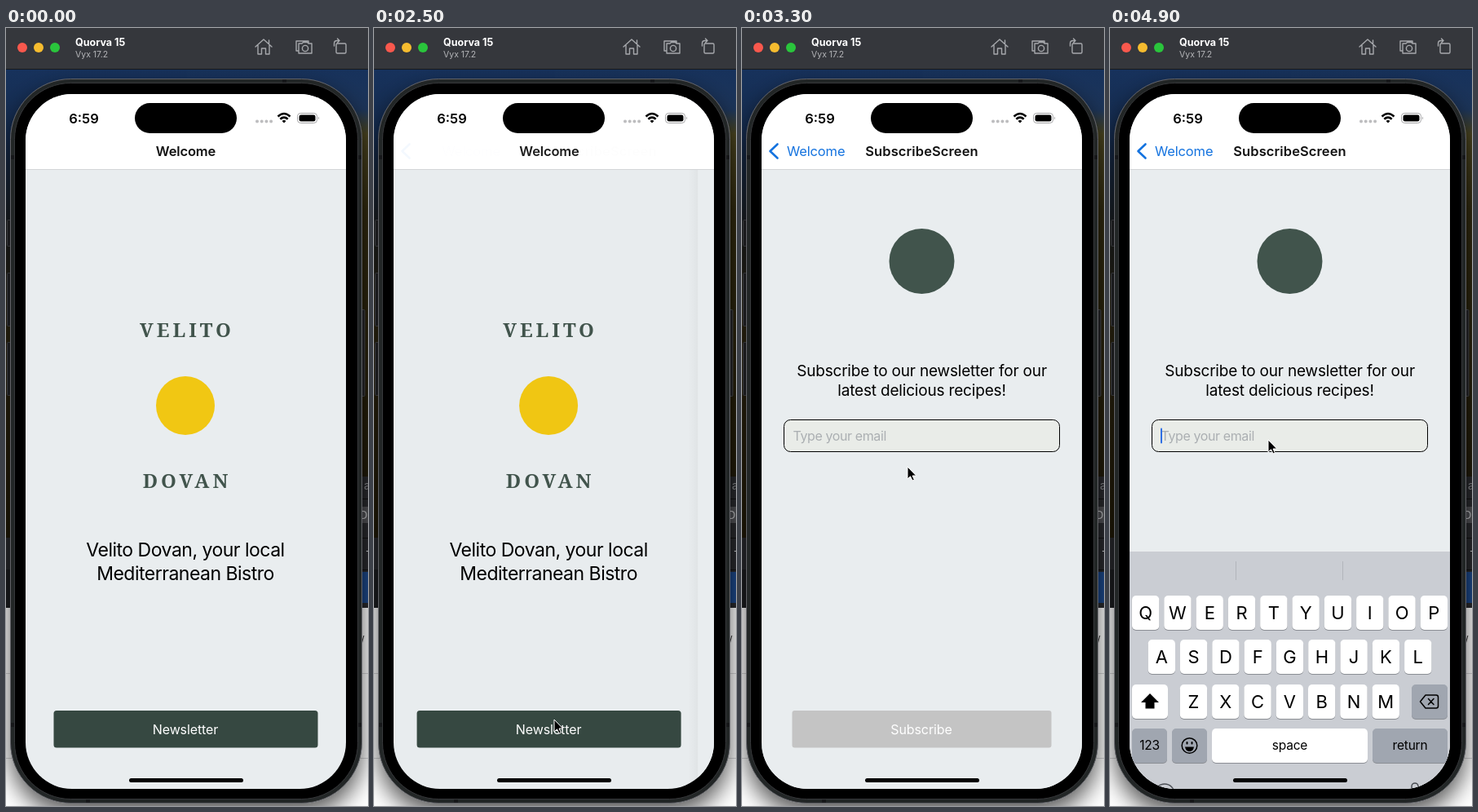
Recreate the animation shown at these times as an HTML page. Size 444 px wide and 954 px high, loop 5 s.

```html
<!DOCTYPE html>
<html lang="en">
<head>
<meta charset="utf-8">
<style>
  html, body { margin: 0; width: 100%; height: 100%; overflow: hidden; background: #fff; }
  svg { display: block; width: 444px; height: 954px; font-family: Inter, sans-serif; }
  .mid { text-anchor: middle; }
  .nav { font-size: 16.5px; font-weight: 600; fill: #111; }
  .label { font-size: 16px; letter-spacing: -.1px; fill: #fff; text-anchor: middle; }
  .headline { font-size: 23px; letter-spacing: -.5px; text-anchor: middle; }
  .lead { font-size: 19px; letter-spacing: -.18px; text-anchor: middle; }
  .brand { font: 700 24px "Noto Serif", serif; letter-spacing: 4px; fill: #41544c; text-anchor: middle; }
  .icon { fill: none; stroke: #a6a8ac; stroke-width: 1.4; stroke-linejoin: round; stroke-linecap: round; }
  .key { font-size: 22px; text-anchor: middle; }
  .word { font-size: 15.5px; letter-spacing: -.2px; text-anchor: middle; }
</style>
</head>
<body>
<svg viewBox="0 0 444 954">
  <defs>
    <linearGradient id="left" x2="0" y2="1">
      <stop stop-color="#17325c"/><stop offset=".15" stop-color="#142a4c"/>
      <stop offset=".34" stop-color="#1a1d1e"/><stop offset=".55" stop-color="#2b2410"/>
      <stop offset="1" stop-color="#1f1806"/>
    </linearGradient>
    <linearGradient id="right" x2="0" y2="1">
      <stop stop-color="#17325c"/><stop offset=".1" stop-color="#1c3458"/>
      <stop offset=".16" stop-color="#4a4420"/><stop offset=".35" stop-color="#30290f"/>
      <stop offset="1" stop-color="#201a08"/>
    </linearGradient>
    <linearGradient id="edge">
      <stop stop-opacity="0"/><stop offset="1" stop-opacity=".035"/>
    </linearGradient>
    <filter id="shade" x="-15%" y="-10%" width="130%" height="120%">
      <feDropShadow dx="0" dy="13" stdDeviation="14" flood-opacity=".65"/>
    </filter>
    <clipPath id="screen"><rect x="24" y="81" width="393" height="852" rx="57"/></clipPath>
  </defs>

  <!-- Desktop -->
  <rect width="444" height="954" fill="#fff"/>
  <rect y="50" width="222" height="575" fill="url(#left)"/>
  <rect x="222" y="50" width="222" height="500" fill="url(#right)"/>
  <path d="M0 625H222V711H0ZM222 550H444V711H222Z" fill="#28292d"/>
  <path d="M0 664H222V711H0Z" fill="#1b1c1f"/>
  <path d="M430 587H444V607H430Z" fill="#505155"/>
  <path d="M430 667H444V705H430Z" fill="#1c4788"/>
  <path d="M0 791.5H444M0 895.5H444" stroke="#d5d5d7"/>
  <path d="M430 577.5H444M430 625.5H444M430 664.5H444" stroke="#111"/>
  <g font-size="13" fill="#c9cacc">
    <text x="439" y="566" fill="#8b8c90">a</text><text x="434" y="602">Di</text><text x="441" y="646">-</text>
    <text x="441" y="692" fill="#fff">⋮</text><text x="435" y="755" fill="#333">/</text>
  </g>

  <!-- Phone -->
  <g fill="#242528" stroke="#4b4c50">
    <rect x="1.500" y="235.500" width="5" height="32" rx="1"/>
    <rect x="1.500" y="300.500" width="5" height="65" rx="1"/>
    <rect x="1.500" y="385.500" width="5" height="65" rx="1"/>
    <rect x="435" y="345.500" width="5" height="106" rx="1"/>
  </g>
  <rect x="5.500" y="62.500" width="431" height="888" rx="74" fill="#242528" stroke="#626468" filter="url(#shade)"/>
  <path d="M339 63H344V68H339ZM98 946H103V950H98ZM6 156H11V161H6ZM431 156H436V161H431ZM6 852H11V857H6ZM431 852H436V857H431Z" fill="#17181a"/>
  <rect x="10.500" y="67.500" width="421" height="878" rx="69" fill="#000" stroke="#37383b"/>

  <!-- Window bar -->
  <rect width="444" height="50" fill="#35373c"/>
  <path d="M0 50.5H444" stroke="#18191c"/>
  <circle cx="20" cy="24" r="6" fill="#f9584d"/>
  <circle cx="40" cy="24" r="6" fill="#f6bc2f"/>
  <circle cx="60" cy="24" r="6" fill="#2ac53c"/>
  <text x="85" y="22" font-size="12.5" font-weight="700" fill="#fff">Quorva 15</text>
  <text x="85" y="36" font-size="10.5" fill="#b4b5b8">Vyx 17.2</text>
  <g class="icon">
    <path d="M306 23L316 14L326 23M309 21V32H313.500V25H318.500V32H323V21M322.500 19V15"/>
    <path d="M358 28H356V16H371V18M359 19H363L364.500 17.500H369.500L371 19H375V31H359Z"/>
    <circle cx="367" cy="25" r="3.600"/>
    <rect x="405" y="19" width="12" height="12" rx="1.500"/>
    <path d="M402.500 22V19Q402.500 15.500 406 15.500H409M406.500 13L409 15.500L406.500 18"/>
  </g>

  <g clip-path="url(#screen)">
    <rect x="24" y="81" width="393" height="852" fill="#e9edef"/>
    <g id="home">
      <text class="brand" x="222" y="379">VELITO</text>
      <circle cx="220" cy="463" r="36" fill="#f1c713"/>
      <text class="brand" x="222" y="564">DOVAN</text>
      <text class="headline" x="220" y="648">Velito Dovan, your local</text>
      <text class="headline" x="220" y="677">Mediterranean Bistro</text>
      <rect x="58.500" y="837" width="324" height="45.500" rx="3.500" fill="#364841"/>
      <text class="label" x="220" y="866">Newsletter</text>
    </g>
    <rect id="dim" x="24" y="174" width="393" height="759"/>
    <g id="subscribe">
      <rect x="12" y="174" width="12" height="759" fill="url(#edge)"/>
      <rect x="24" y="174" width="393" height="759" fill="#e9edef"/>
      <circle cx="220.500" cy="286" r="40" fill="#41544c"/>
      <text class="lead" x="220.500" y="426.500">Subscribe to our newsletter for our</text>
      <text class="lead" x="220.500" y="450.500">latest delicious recipes!</text>
      <rect x="51.500" y="480.500" width="338" height="39" rx="8" fill="#e9ece8" stroke="#000"/>
      <text x="62.500" y="506" font-size="16" letter-spacing="-.39" fill="#abafb2">Type your email</text>
      <rect id="caret" x="62" y="490.500" width="2" height="19" rx="1" fill="#2f6fe4"/>
      <rect x="61.500" y="837" width="318" height="45.500" rx="3" fill="#c4c4c4"/>
      <text class="label" x="220" y="866">Subscribe</text>
    </g>

    <rect x="24" y="81" width="393" height="92" fill="#fff"/>
    <path d="M24 173.500H417" stroke="#d3d5d7"/>
    <text id="homeTitle" class="nav mid" x="220.500" y="157" letter-spacing="-.15">Welcome</text>
    <text id="subTitle" class="nav mid" x="220.500" y="157" letter-spacing=".1">SubscribeScreen</text>
    <path id="chevron" d="M43.500 142.500L34.500 151L43.500 159.500" fill="none" stroke="#1473df" stroke-width="2.600" stroke-linecap="round" stroke-linejoin="round"/>
    <text id="back" x="55" y="157" font-size="16.500" letter-spacing="-.15" fill="#1473df">Welcome</text>

    <text class="mid" x="95.500" y="116.500" font-size="16.500" font-weight="600">6:59</text>
    <rect x="158" y="92" width="125" height="37" rx="18.500"/>
    <path d="M308 114.500H326" stroke="#bdbdbf" stroke-width="4" stroke-linecap="round" stroke-dasharray="0 5.700"/>
    <g fill="none" stroke="#000" stroke-width="2.500">
      <path d="M333.500 108.500Q341 101.500 348.500 108.500M336.300 111.700Q341 107.500 345.700 111.700"/>
      <path d="M341 116.500L338.500 114Q341 112 343.500 114Z" fill="#000" stroke="none"/>
    </g>
    <rect x="357.500" y="104.500" width="24" height="12" rx="3.800" fill="none" stroke="#a5a5a7"/>
    <rect x="359.500" y="106.500" width="20" height="8" rx="2.300"/>
    <path d="M383 108.500Q385 110.500 383 112.500Z" fill="#a5a5a7"/>

    <g id="keyboard">
      <rect x="24" y="642" width="393" height="400" fill="#cacdd3"/>
      <path d="M154.500 654V677M285.500 654V677" stroke="#b2b5bb"/>
      <g id="keys"></g>
      <path d="M49 816L38 827H43.500V834.500H54.500V827H60Z"/>
      <g fill="none" stroke="#000" stroke-width="1.500" stroke-linejoin="round" stroke-linecap="round">
        <path d="M380.500 826L387 818H400Q402.500 818 402.500 820.500V831.500Q402.500 834 400 834H387ZM390.500 822.500L397 829.500M397 822.500L390.500 829.500"/>
        <circle cx="97.500" cy="880" r="9.300"/>
        <path d="M92 881.500H103Q102 887 97.500 887T92 881.500Z" fill="#000" stroke="none"/>
        <path d="M94.500 876V877.500M100.500 876V877.500" stroke-width="2"/>
        <g stroke="#4b4e54">
          <circle cx="67" cy="939" r="12"/><path d="M63 934V936M71 934V936"/>
          <rect x="370" y="926" width="8" height="16" rx="4"/>
        </g>
      </g>
    </g>
    <rect x="151" y="920" width="140" height="5" rx="2.500"/>
  </g>
  <path id="cursor" d="M0 0V15L3.500 11.800L6 17L8.400 16L6 11H10.700Z" stroke="#fff" stroke-width="1" stroke-linejoin="round"/>
</svg>
<script>
const el = id => document.getElementById(id);
const LOOP = 5000, STEP = 100;
const PUSH_START = 2481, KEYBOARD_START = 4712;

// Cursor stops: time, x, y
const stops = [
  [0, 452, 905], [600, 452, 905], [1100, 215, 832], [1800, 230, 852], [2300, 221, 848],
  [3000, 221, 848], [3300, 203, 538], [3500, 203, 538], [3900, 194, 505], [LOOP, 194, 505]
];

function key(x, y, width, label, cls = 'key', fill = '#fff') {
  return `<rect x="${x}" y="${y + 1}" width="${width}" height="42" rx="5" fill="#8b8e94"/>
    <rect x="${x}" y="${y}" width="${width}" height="42" rx="5" fill="${fill}"/>
    <text class="${cls}" x="${x + width / 2}" y="${y + (cls === 'key' ? 29 : 26.5)}">${label}</text>`;
}
const row = (letters, x, y) => [...letters].map((c, i) => key(x + i * 39.3, y, 33.3, c)).join('');
const grey = '#a0a6b0';
el('keys').innerHTML =
  row('QWERTYUIOP', 27, 696) + row('ASDFGHJKL', 46.7, 750) + row('ZXCVBNM', 85.8, 805) +
  key(27, 805, 44, '') + key(370, 805, 44, '', 'key', grey) +
  key(27, 859, 43, '123', 'word', grey) + key(76, 859, 43, '', 'word', grey) +
  key(125, 859, 191, 'space', 'word') + key(322, 859, 92, 'return', 'word', grey);

// Remaining distance of a critically damped spring, 1 to 0
function spring(ms) {
  const x = Math.max(0, ms) * 0.01872;
  return (1 + x) * Math.exp(-x);
}
const move = (id, x, y = 0) => el(id).setAttribute('transform', `translate(${x} ${y})`);
const fade = (id, value) => el(id).setAttribute('opacity', value);

function draw(t) {
  const rest = spring(t - PUSH_START), done = 1 - rest;
  move('home', -118 * done);
  move('subscribe', 393 * rest);
  fade('subscribe', +(done > 0));
  fade('dim', 0.1 * done);
  move('homeTitle', -110 * done);
  fade('homeTitle', rest);
  move('subTitle', 60 * rest);
  fade('subTitle', done * done);
  move('back', 30 * rest);
  fade('back', done * done);
  fade('chevron', done);

  move('keyboard', 0, 336 * spring(t - KEYBOARD_START) - 45);
  fade('keyboard', +(t > KEYBOARD_START));
  fade('caret', +(t > KEYBOARD_START));

  const i = stops.findIndex(s => s[0] > t);
  const [t0, x0, y0] = stops[i - 1], [t1, x1, y1] = stops[i];
  const u = (t - t0) / (t1 - t0), k = u * u * (3 - 2 * u);
  move('cursor', x0 + (x1 - x0) * k, y0 + (y1 - y0) * k);
}

function tick() {
  draw(Math.floor(performance.now() % LOOP / STEP) * STEP);
  requestAnimationFrame(tick);
}
tick();
</script>
</body>
</html>
```
